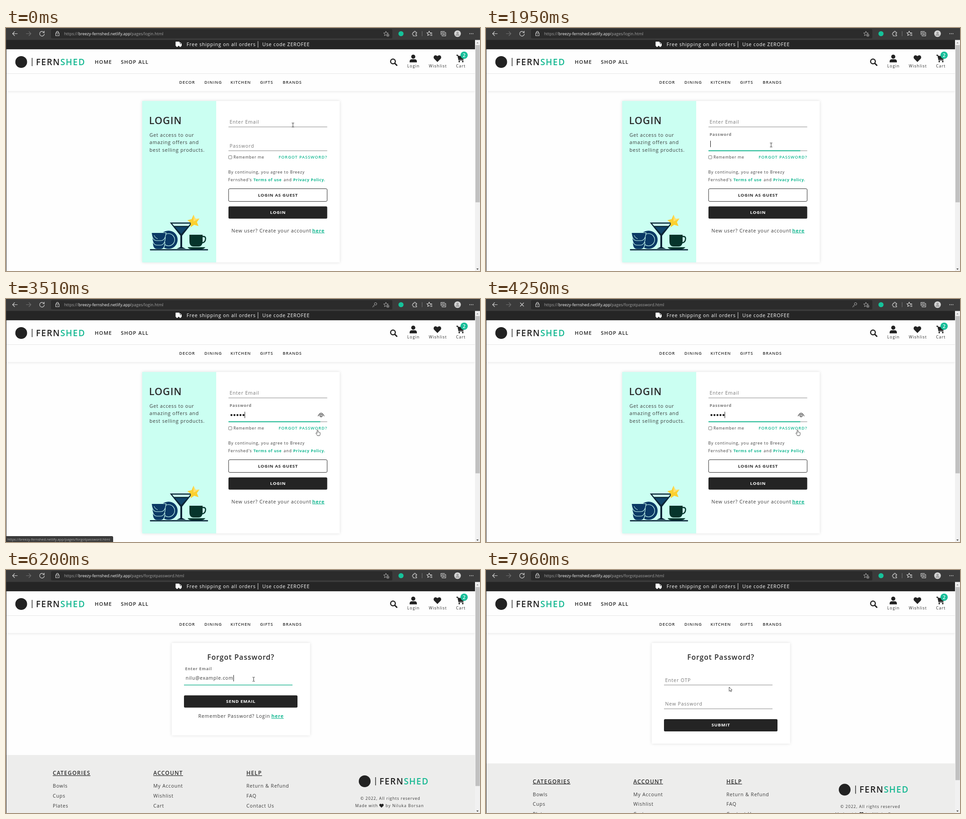
Recreate the animation shown at these times as an HTML page. Size 1044 by 536 pixels, loop 8 s.

```html
<!DOCTYPE html>
<html lang="en">
<head>
<meta charset="utf-8">
<title>Password reset</title>
<style>
  html, body { margin: 0; width: 100%; height: 100%; overflow: hidden; background: #fefefe; }
  svg { display: block; width: 100%; height: 100%; }
  text { font-family: "Open Sans", "Noto Sans", sans-serif; fill: #2b2b2b; white-space: pre; }
  .body { font-size: 10.6px; letter-spacing: .78px; fill: #3a3a3a; }
  .small { font-size: 8.8px; letter-spacing: .8px; fill: #3a3a3a; }
  .icon { font-size: 8.7px; letter-spacing: 1.1px; }
  .menu { font-size: 11.3px; letter-spacing: 1px; font-weight: 600; fill: #222; }
  .cats { font-size: 9px; letter-spacing: 1px; font-weight: 600; }
  .brand { font-size: 18.9px; letter-spacing: 1.55px; font-weight: 600; fill: #222; }
  .btn { font-size: 9.6px; letter-spacing: .72px; font-weight: 700; text-anchor: middle; }
  .head { font-size: 12px; letter-spacing: 1.2px; font-weight: 600; text-decoration: underline; }
  .accent { fill: #16b892; }
  .link { fill: #16b892; font-weight: 700; }
  .here { text-decoration: underline; }
  .url { font-size: 9px; fill: #a3a3a3; }
  .white { fill: #fff; }
  .mid { text-anchor: middle; }
  .line { fill: none; stroke: #d8d8d8; stroke-width: 1.1; stroke-linecap: round; stroke-linejoin: round; }
</style>
</head>
<body>
<svg viewBox="0 0 1044 536">
  <defs>
    <filter id="soft" x="-10%" y="-10%" width="120%" height="125%">
      <feDropShadow dx="0" dy="0" stdDeviation="3" flood-color="#000" flood-opacity=".13"/>
    </filter>
    <path id="heart" d="M0 7.5L-7.2 .3C-9.3-2-8.4-6.3-5-7.2C-2.8-7.8-1-6.6 0-5.2C1-6.6 2.8-7.8 5-7.2C8.4-6.3 9.3-2 7.2 .3Z"/>
    <path id="star" d="M0-5.2L1.5-1.7 5.2-1.5 2.4.9 3.3 4.5 0 2.5-3.3 4.5-2.4.9-5.2-1.5-1.5-1.7Z"/>
    <g id="logo">
      <circle cx="33.5" cy="75" r="13" fill="#222"/>
      <path d="M57.5 66V84" stroke="#222" stroke-width="1.4"/>
      <text class="brand" x="66" y="81.7">FERN<tspan class="accent">SHED</tspan></text>
    </g>
  </defs>
  <rect width="1044" height="536" fill="#fefefe"/>

  <g id="login">
    <rect x="300" y="161" width="435" height="356" fill="#fff" filter="url(#soft)"/>
    <rect x="300" y="161" width="163" height="356" fill="#cbfff2"/>
    <text x="315" y="212" font-size="21.8" font-weight="600" letter-spacing=".9">LOGIN</text>
    <text class="body" x="316" y="240">Get access to our</text>
    <text class="body" x="316" y="256.4">amazing offers and</text>
    <text class="body" x="316" y="272.7">best selling products.</text>
    <g id="crockery">
      <circle cx="358" cy="467" r="20" fill="#0b3a66"/>
      <circle cx="358" cy="467" r="13.5" fill="none" stroke="#cbfff2" stroke-width="1.2"/>
      <g fill="#0b3a66" stroke="#cbfff2" stroke-width="1.2">
        <path d="M323 473H350Q350 488 340 488H333Q323 488 323 473Z"/>
        <path d="M322 462H351Q350 479 340 479H333Q323 479 322 462Z"/>
        <path d="M320.500 451.500H352.500Q351 469 341 469H332Q322 469 320.500 451.500Z"/>
      </g>
      <path d="M326 457Q328 463 334 465" fill="none" stroke="#cbfff2"/>
      <path d="M361 429H411L388 458V483L396 487H376L384 483V458Z" fill="#0a2438"/>
      <path d="M366 431.500H406L402 436.500H370Z" fill="#cbfff2"/>
      <path d="M372 439H400L386 454Z" fill="#12456b"/>
      <path d="M413 412L417.500 421 426 420.500 420.500 428 424 437 414.500 434 406.500 439.500 407 430 399.500 424 409 421.500Z" fill="#fbd02f"/>
      <path d="M413 412L417.500 421 426 420.500 413 427Z" fill="#ffe070"/>
      <path d="M404 456H433V470Q433 482 424 482H413Q404 482 404 470Z" fill="#06352c"/>
      <path d="M433 460Q440 459 439.500 465Q439 473 432 474" fill="none" stroke="#06352c" stroke-width="2.6"/>
      <path d="M400 483.500H439Q436 488 430 488H409Q403 488 400 483.500Z" fill="#06352c"/>
      <rect x="317" y="487.800" width="128" height="2.600" rx="1" fill="#0a2438"/>
    </g>
    <g id="loginFields"></g>
    <g id="dots" fill="#222"></g>
    <g id="eye" fill="none" stroke="#222" stroke-width="1.2" stroke-linecap="round">
      <path d="M687.500 258Q694 245.500 700.500 258"/><circle cx="694" cy="257.300" r="2.500"/>
    </g>
    <rect x="490.300" y="281.500" width="7.200" height="7.200" rx="1.300" fill="#fff" stroke="#555" stroke-width=".8"/>
    <text class="small" x="501" y="288.300" style="font-size:8.5px">Remember me</text>
    <text class="cats accent" x="600.500" y="288.300">FORGOT PASSWORD?</text>
    <text class="small" x="489.500" y="321.300">By continuing, you agree to Breezy</text>
    <text class="small" x="489.500" y="338">Fernshed's</text>
    <text class="small" x="611.500" y="338">and</text>
    <g style="letter-spacing:.62px">
      <text class="link" font-size="8.7" x="545" y="338">Terms of use</text>
      <text class="link" font-size="8.7" x="632.500" y="338">Privacy Policy.</text>
    </g>
    <rect x="490.300" y="354.500" width="217" height="28" rx="2.500" fill="#fff" stroke="#2b2b2b"/>
    <text class="btn" x="599" y="371.500">LOGIN AS GUEST</text>
    <rect x="490" y="393.500" width="217.500" height="27" rx="2.500" fill="#242424"/>
    <text class="btn white" x="599" y="410.100">LOGIN</text>
    <text class="body" x="496.500" y="450.600">New user? Create your account</text>
    <text class="body link here" x="674.500" y="450.600" style="fill:#16b892">here</text>
  </g>

  <g id="reset">
    <rect id="card" x="365" y="161" width="304.500" height="203.500" fill="#fff" filter="url(#soft)"/>
    <text class="mid" x="517.300" y="197.500" font-size="15.800" font-weight="600" letter-spacing=".9">Forgot Password?</text>
    <g id="mailFields"></g>
    <g id="otpFields"></g>
    <text id="mail" class="body" x="395.800" y="242" style="font-size:10.4px">nilu@example.com</text>
    <g id="button">
      <rect x="392" y="276.400" width="250" height="27" rx="2.500" fill="#242424"/>
      <text id="buttonText" class="btn white" x="517.300" y="292.700"></text>
    </g>
    <g id="back">
      <text class="body" x="423.500" y="326">Remember Password? Login</text>
      <text class="body link here" x="584.500" y="326" style="fill:#16b892">here</text>
    </g>
    <g id="footer">
      <rect y="408" width="1034" height="160" fill="#ededec"/>
      <g id="columns"></g>
      <use href="#logo" x="756.500" y="391"/>
      <text class="small mid" x="846.500" y="506.600" style="letter-spacing:.9px">© 2022, All rights reserved</text>
      <text class="small" x="769" y="523">Made with</text>
      <use href="#heart" transform="translate(827 520) scale(.58)" fill="#222"/>
      <text class="small" x="836" y="523" style="letter-spacing:.95px">by Niluka Borsan</text>
    </g>
  </g>
  <path id="caret" stroke="#111"/>

  <g id="header">
    <rect y="100" width="1034" height="39" fill="#fefefe" filter="url(#soft)"/>
    <rect y="46" width="1034" height="54" fill="#fefefe"/>
    <path d="M0 100.500H1034" stroke="#e6e6e6"/>
    <rect y="26" width="1034" height="20.900" fill="#252525"/>
    <g class="white">
      <path d="M374 30H382V32H384.500L387 35V39.500H386A2.200 2.200 0 0 1 381.600 39.500H379A2.200 2.200 0 0 1 374.600 39.500H373.500V30.500Z"/>
      <path d="M383 33.200H384.200L385.800 35.300H383Z" fill="#252525"/>
      <circle cx="376.800" cy="39.600" r="1.700"/><circle cx="383.800" cy="39.600" r="1.700"/>
    </g>
    <text class="body" x="397.800" y="39.800" style="fill:#fff">Free shipping on all orders</text>
    <path d="M555 29V43" stroke="#ddd"/>
    <text class="body" x="564.500" y="39.800" style="fill:#fff">Use code ZEROFEE</text>
    <use href="#logo"/>
    <text class="menu" x="195.500" y="79.200">HOME</text>
    <text class="menu" x="253" y="79.200">SHOP ALL</text>
    <g id="cats"></g>
    <g fill="#222">
      <circle cx="852.300" cy="73.800" r="5.200" fill="none" stroke="#222" stroke-width="2.500"/>
      <path d="M856.500 78L860.700 82.200" stroke="#222" stroke-width="3" stroke-linecap="round"/>
      <circle cx="897" cy="63.300" r="4.500"/>
      <path d="M889 75.800V74Q889 69 894 69H900Q905 69 905 74V75.800Z"/>
      <use href="#heart" x="950.200" y="67.500"/>
      <path d="M992 60H995L997.500 70.500H1007.500" fill="none" stroke="#222" stroke-width="1.800"/>
      <path d="M995.500 61.500H1009.500L1007.500 69H997.200Z"/>
      <circle cx="998.300" cy="74" r="1.800"/><circle cx="1006" cy="74" r="1.800"/>
    </g>
    <circle cx="1009" cy="60" r="8" fill="#16be99"/>
    <text class="mid" x="1009" y="63.800" font-size="10.500" font-weight="600" style="fill:#fff">2</text>
    <text class="icon mid" x="897.500" y="86.700">Login</text>
    <text class="icon mid" x="951.200" y="86.700">Wishlist</text>
    <text class="icon mid" x="1001.800" y="86.700">Cart</text>
  </g>

  <g id="scrollbar">
    <rect x="1033" y="26" width="11" height="510" fill="#f1f1f1"/>
    <path d="M1036 34L1038.500 31 1041 34Z" fill="#999"/>
    <path d="M1036 530.500L1038.500 533.500 1041 530.500Z" fill="#444"/>
    <rect id="thumb" x="1034" y="37.500" width="9.500" fill="#c1c1c1"/>
  </g>
  <path d="M.5 26V536" stroke="#333"/>

  <g id="toolbar">
    <rect width="1044" height="26.400" fill="#3b3b3b"/>
    <rect x="99" y="2.500" width="752" height="20.500" rx="3" fill="#2b2b2b"/>
    <path class="line" d="M25 12.500H14.500M19 8L14.500 12.500 19 17"/>
    <path class="line" d="M44.500 12.500H55M50.500 8L55 12.500 50.500 17" style="stroke:#707070"/>
    <path id="reload" class="line" d="M83.800 10A5.200 5.200 0 1 0 84.500 13M84.200 6.800V10.200H80.800"/>
    <path id="stop" class="line" d="M75.500 8.500L83 16M83 8.500L75.500 16"/>
    <path class="line" d="M109.500 11H117V17H109.500ZM111 11V9.500A2.200 2.200 0 0 1 115.500 9.500V11M113.200 13.500V14.500"/>
    <text class="url" x="128" y="15.800">https://</text>
    <text class="url" x="159.300" y="15.800" style="fill:#f2f2f2">breezy-fernshed.netlify.app</text>
    <text id="path" class="url" x="273" y="15.800"></text>
    <g id="key" class="line" style="stroke:#aaa;stroke-width:1"><circle cx="814" cy="10.700" r="2.700"/><path d="M812 12.700L808 16.700V18M809.500 15.200L811 16.500"/></g>
    <use class="line" href="#star" x="836.800" y="12.500" style="stroke-width:1;stroke:#aaa"/>
    <circle cx="841" cy="16" r="2.900" fill="#2b2b2b" stroke="#aaa" stroke-width=".8"/>
    <path class="line" d="M839.700 16H842.300M841 14.700V17.300" style="stroke-width:.8"/>
    <circle cx="870" cy="12.500" r="5.600" fill="#15c39a"/>
    <path class="line" d="M896.500 9.500H899A1.700 1.700 0 1 1 902 9.500H904.500V12A1.600 1.600 0 1 0 904.500 15V17.500H897V15A1.700 1.700 0 1 1 896.500 11.500Z"/>
    <path d="M916.500 7V18" stroke="#777"/>
    <use class="line" href="#star" x="932" y="12"/>
    <path d="M934 12.200H940V18H932.500Z" fill="#3b3b3b"/>
    <path class="line" d="M934.500 11H938.500M935 13.700H938.500M935 16.400H938.500"/>
    <path class="line" d="M960.500 10H968.500V17.500H960.500ZM958 14.500V7.500H966M964.500 11.800V15.700M962.500 13.700H966.500"/>
    <circle cx="994.500" cy="12.500" r="7.300" fill="#d6d6d6"/>
    <g fill="#a2a2a2"><circle cx="994.500" cy="10.700" r="2.500"/><path d="M990 17A4.500 3.700 0 0 1 999 17Z"/></g>
    <g fill="#ddd"><circle cx="1021.500" cy="12.500" r=".9"/><circle cx="1025" cy="12.500" r=".9"/><circle cx="1028.500" cy="12.500" r=".9"/></g>
  </g>

  <g id="status">
    <path d="M0 523H233Q236 523 236 526V536H0Z" fill="#3b3b3b"/>
    <text x="3" y="532.700" font-size="7.700" style="fill:#b0b0b0">https://breezy-fernshed.netlify.app/pages/forgotpassword.html</text>
  </g>

  <g id="cursor">
    <path id="arrow" d="M-2.500-5V4.500L-.3 2.400 1.200 5.700 2.600 5.100 1.200 1.900H4.200Z" fill="#fff" stroke="#222" stroke-width=".8"/>
    <path id="beam" d="M-2.500-4.500H-.8L0-4 .8-4.500H2.500M0-4V4M-2.500 4.500H-.8L0 4 .8 4.500H2.500" fill="none" stroke="#333"/>
    <path id="hand" d="M-1.900 1.500V-5A1.100 1.100 0 0 1 .3-5V-1.300A1 1 0 0 1 2.100-.9A1 1 0 0 1 3.700-.4A.9.9 0 0 1 5 .4V2.500C5 5 4 5.500 3.800 6.500H-1.200C-1.500 5-4 2.700-4.400 1.400C-4.700.2-3.400-.3-2.700.6Z" fill="#fff" stroke="#222" stroke-width=".8"/>
  </g>
</svg>

<script>
const LOOP = 8000, BLINK = 530;
const $ = id => document.getElementById(id);
const show = (id, on) => $(id).style.display = on ? '' : 'none';
const clamp = v => Math.max(0, Math.min(1, v));
const ease = p => p * p * (3 - 2 * p);
const ramp = (t, start, length) => ease(clamp((t - start) / length));
const mix = (a, b, p) => a + (b - a) * p;

// Input with a floating label and an accent line growing from the left.
function field(parent, x, y, w, label, thick = 1.3, reach = 1) {
  const g = document.createElementNS('http://www.w3.org/2000/svg', 'g');
  g.innerHTML = `<rect x="${x}" y="${y - .6}" width="${w}" height="1.2" fill="#999"/>
    <rect x="${x}" y="${y - thick / 2}" height="${thick}" fill="#16b892"/>
    <text x="${x + 2.5}" letter-spacing=".83">${label}</text>`;
  $(parent).append(g);
  const [, accent, text] = g.children;
  return p => {
    accent.setAttribute('width', w * reach * p);
    text.setAttribute('y', y - mix(7, 33, p));
    text.style.cssText = `font-size:${mix(10.6, 8.8, p)}px;fill:#777;font-weight:${p > .5 ? 700 : 400}`;
  };
}

const email = field('loginFields', 490, 218.2, 217.5, 'Enter Email');
const password = field('loginFields', 490, 270.7, 217.5, 'Password', 2, .93);
const resetMail = field('mailFields', 392, 253.6, 239, 'Enter Email');
field('otpFields', 392, 253.6, 239, 'Enter OTP')(0);
field('otpFields', 392, 306.2, 239, 'New Password')(0);

[['DECOR', 381.5], ['DINING', 437], ['KITCHEN', 494.5], ['GIFTS', 559.5], ['BRANDS', 609.5]].forEach(([name, x]) =>
  $('cats').innerHTML += `<text class="cats" x="${x}" y="123.100">${name}</text>`);

[[103, 'CATEGORIES', 'Bowls', 'Cups', 'Plates'],
 [324.5, 'ACCOUNT', 'My Account', 'Wishlist', 'Cart'],
 [529.5, 'HELP', 'Return &amp; Refund', 'FAQ', 'Contact Us']].forEach(([x, head, ...items]) => {
  $('columns').innerHTML += `<text class="head" x="${x}" y="452">${head}</text>` +
    items.map((s, i) => `<text class="body" x="${x}" y="${480 + i * 21.8}">${s}</text>`).join('');
});

const typed = [2060, 2220, 2290, 2360, 2450];
$('dots').innerHTML = typed.map((_, i) => `<circle cx="${496.6 + i * 6.6}" cy="256" r="2.2"/>`).join('');

// Pointer stops: time, x, y
const stops = [
  [0, 632, 214], [720, 632, 214], [805, 632, 230], [1150, 631, 246], [1290, 631, 246], [1430, 628, 258],
  [2640, 628, 258], [2970, 640, 424], [3030, 640, 424], [3500, 687, 295], [4780, 687, 295], [5200, 545.5, 241],
  [6590, 545.5, 241], [6820, 546, 281], [7010, 546, 281], [7020, 544, 282], [7285, 544, 282],
  [7286, 640, 301], [7810, 640, 301], [7950, 538, 263], [LOOP, 538, 263]];

function pointer(t) {
  const i = stops.findIndex(s => s[0] > t);
  const a = stops[i - 1], b = stops[i], p = ramp(t, a[0], b[0] - a[0]);
  return [mix(a[1], b[1], p), mix(a[2], b[2], p)];
}

// Regions: left, right, top, bottom, shape
const regions = {
  login: [[490, 707, 195, 219, 'beam'], [490, 707, 247, 271, 'beam'], [601, 707, 280, 292, 'hand'],
          [490, 707, 354, 383, 'hand'], [490, 707, 394, 421, 'hand']],
  mail: [[392, 631, 228, 254, 'beam'], [392, 642, 275, 303, 'hand']],
  otp: [[392, 631, 228, 254, 'beam'], [392, 631, 280, 306, 'beam'], [392, 642, 329, 356, 'hand']]
};

function shapeAt(page, x, y) {
  const hit = regions[page].find(([l, r, top, bottom]) => x >= l && x <= r && y >= top && y <= bottom);
  return hit ? hit[4] : 'arrow';
}

function drawCaret(t, page, count) {
  let x, y, since;
  if (page === 'login' && t < 1450) [x, y, since] = [494.5, 218, 200];
  else if (page === 'login') [x, y, since] = [count ? 493 + count * 6.6 : 494.5, 270.7, count ? typed[count - 1] : 1450];
  else [x, y, since] = t < 6130 ? [396.5, 253.7, 5600] : [396.5 + $('mail').getComputedTextLength(), 253.7, 6130];
  const clock = page === 'login' ? Math.min(t, 3840) : t;
  show('caret', page !== 'otp' && clock >= since && Math.floor((clock - since) / BLINK) % 2 === 0);
  $('caret').setAttribute('d', `M${x} ${y - 22}V${y - 8}`);
}

function draw(t) {
  const page = t < 4590 ? 'login' : t < 7220 ? 'mail' : 'otp';
  const otp = page === 'otp';
  show('login', page === 'login');
  show('reset', page !== 'login');
  show('mailFields', page === 'mail');
  show('otpFields', otp);
  show('back', !otp);
  $('card').setAttribute('height', otp ? 222 : 203.5);
  $('button').setAttribute('transform', `translate(0 ${otp ? 52.6 : 0})`);
  $('buttonText').textContent = otp ? 'SUBMIT' : 'SEND EMAIL';
  $('footer').setAttribute('transform', `translate(0 ${otp ? 18.6 : 0})`);
  $('thumb').setAttribute('height', { login: 347, mail: 439, otp: 426 }[page]);

  email(ramp(t, 150, 400) - ramp(t, 1450, 400));
  password(ramp(t, 1450, 400));
  resetMail(ramp(t, 5530, 340));
  const count = typed.filter(s => t >= s).length;
  [...$('dots').children].forEach((dot, i) => dot.style.display = i < count ? '' : 'none');
  show('eye', count > 0);
  show('mail', page === 'mail' && t >= 6130);
  drawCaret(t, page, count);

  const loading = t >= 3840 && t < 4660;
  show('reload', !loading);
  show('stop', loading);
  show('key', t >= typed[0] && t < 6200);
  $('path').textContent = '/pages/' + (t < 4250 ? 'login' : 'forgotpassword') + '.html';

  const [x, y] = pointer(t);
  const shape = t >= 3500 && t < 4800 ? 'hand' : shapeAt(page, x, y - 5);
  ['arrow', 'beam', 'hand'].forEach(s => show(s, s === shape));
  $('cursor').setAttribute('transform', `translate(${x} ${y})`);
  show('status', t >= 3450 && t < 3840);
}

const start = performance.now();
(function tick() {
  draw((performance.now() - start) % LOOP);
  requestAnimationFrame(tick);
})();
</script>
</body>
</html>
```
